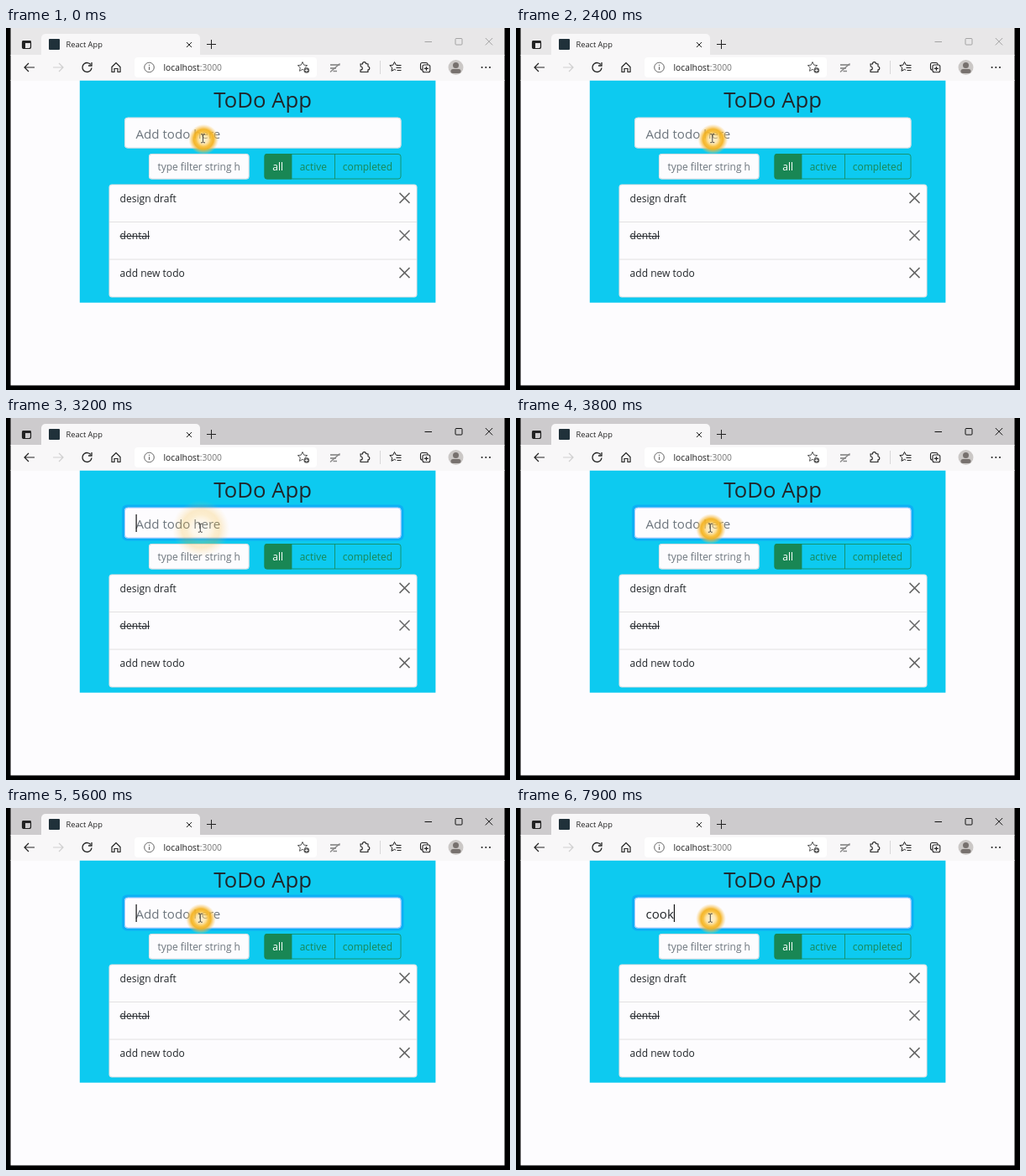
These frames come from a looping animation (600 px wide and 432 px high, 8 s). An HTML page with a canvas:

```html
<!DOCTYPE html>
<html lang="en">
<head>
<meta charset="utf-8">
<title>ToDo App</title>
<style>
html, body { margin: 0; width: 100%; height: 100%; overflow: hidden; background: #000; }
canvas { display: block; width: 600px; height: 432px; }
</style>
</head>
<body>
<canvas id="stage"></canvas>
<script>
const LOOP = 8000;
const FONT = '"Open Sans", "Noto Sans", sans-serif';
const INK = '#212529', MUTED = '#6c757d', GREEN = '#198754', CYAN = '#0dcaf0';
const PAGE = '#fdfcfe', BAR = '#f8f7f8';
const PRESS = 3000, FOCUS_AT = 3050, BLINK = 530;
const KEYS = [6850, 7100, 7300, 7550];
const WORD = 'cook';

const canvas = document.getElementById('stage');
const ctx = canvas.getContext('2d');
const dpr = window.devicePixelRatio || 1;
canvas.width = 600 * dpr;
canvas.height = 432 * dpr;

const clamp = v => Math.max(0, Math.min(1, v));
const ease = v => v * v * (3 - 2 * v);
const span = (t, a, b) => clamp((t - a) / (b - a));

function fill(x, y, w, h, color, r = 0) {
  ctx.fillStyle = color;
  ctx.beginPath();
  ctx.roundRect(x, y, w, h, r);
  ctx.fill();
}

function box(x, y, w, h, color, r = 0, lw = 1) {
  ctx.strokeStyle = color;
  ctx.lineWidth = lw;
  ctx.beginPath();
  ctx.roundRect(x, y, w, h, r);
  ctx.stroke();
}

// Each path is a flat list of x, y pairs.
function lines(color, lw, ...paths) {
  ctx.strokeStyle = color;
  ctx.lineWidth = lw;
  ctx.beginPath();
  for (const p of paths) {
    ctx.moveTo(p[0], p[1]);
    for (let i = 2; i < p.length; i += 2) ctx.lineTo(p[i], p[i + 1]);
  }
  ctx.stroke();
}

function arc(x, y, r, color, lw, from = 0, to = Math.PI * 2) {
  ctx.strokeStyle = color;
  ctx.lineWidth = lw;
  ctx.beginPath();
  ctx.arc(x, y, r, from, to);
  ctx.stroke();
}

function disc(x, y, r, color) {
  ctx.fillStyle = color;
  ctx.beginPath();
  ctx.arc(x, y, r, 0, Math.PI * 2);
  ctx.fill();
}

function text(str, x, y, size, color, weight = 400) {
  ctx.font = `${weight} ${size}px ${FONT}`;
  ctx.fillStyle = color;
  ctx.fillText(str, x, y);
  return ctx.measureText(str).width;
}

function cross(x, y, r, color, lw) {
  lines(color, lw, [x - r, y - r, x + r, y + r], [x + r, y - r, x - r, y + r]);
}

function plus(x, y, r, color, lw) {
  lines(color, lw, [x - r, y, x + r, y], [x, y - r, x, y + r]);
}

function star(x, y, r, color) {
  const pts = [];
  for (let i = 0; i <= 10; i++) {
    const a = -Math.PI / 2 + i * Math.PI / 5;
    const d = i % 2 ? r * 0.48 : r;
    pts.push(x + d * Math.cos(a), y + d * Math.sin(a));
  }
  lines(color, 1, pts);
}

function arrow(x, y, dir, color) {
  lines(color, 1.2, [x - 6 * dir, y, x + 6 * dir, y],
    [x - dir, y - 5, x - 6 * dir, y, x - dir, y + 5]);
}

function tabStrip(active) {
  fill(5.5, 0, 588, 33, active ? '#cdcbcd' : '#e8e7e8');
  box(19.5, 15.5, 10, 9, '#222', 2, 1.2);
  fill(19.5, 15, 10, 3, '#222');
  fill(19.5, 17, 3.5, 7, '#222');

  fill(42, 7, 189, 27, BAR, [5, 5, 0, 0]);
  fill(51, 13, 13, 13, '#20313a', 1);
  text('React App', 71.5, 23, 9.25, '#222');
  cross(218, 20, 3, '#222', 1);
  plus(244.5, 19.5, 5.5, '#222', 1);

  const c = active ? '#111' : '#a3a3a3';
  lines(c, 1, [498.5, 16.5, 507, 16.5]);
  box(535, 12.5, 8, 7.5, c, 1);
  cross(575, 16.2, 4.2, c, 1);
}

function toolbar() {
  fill(5.5, 32, 588, 31, BAR);
  arrow(28, 47, 1, '#222');
  arrow(62, 47, -1, '#d0d0d0');
  arc(96.5, 47, 5.5, '#222', 1.3, 0.1, 5.6);
  lines('#222', 1.3, [102, 41, 102, 45, 98, 45]);
  lines('#222', 1.2, [126, 46.5, 131, 41.5, 136, 46.5, 136, 52.5, 133, 52.5,
    133, 48.5, 129, 48.5, 129, 52.5, 126, 52.5, 126, 46]);

  fill(153, 35, 217, 24, '#fff', 4);
  arc(170.5, 47, 5.8, '#666', 1);
  lines('#666', 1.1, [170.5, 46.2, 170.5, 50], [170.5, 43.7, 170.5, 44.9]);
  const w = text('localhost', 187.5, 50.6, 10.3, '#1d1d1d');
  text(':3000', 187.5 + w, 50.6, 10.3, '#777');

  star(353, 46.5, 6, '#555');
  disc(357.8, 50.5, 3.8, '#fff');
  disc(357.8, 50.5, 3.3, '#555');
  plus(357.8, 50.5, 1.9, '#fff', 0.9);

  lines('#999', 1.8, [386, 44, 397.5, 44], [386, 48, 393, 48]);
  lines('#888', 1.4, [386, 52.5, 397.5, 42.5], [389.5, 51.5, 394, 51.5]);

  ctx.strokeStyle = '#222';
  ctx.lineWidth = 1.1;
  ctx.beginPath();
  ctx.moveTo(422, 43);
  ctx.lineTo(424.5, 43);
  ctx.arc(426.5, 42.6, 2, Math.PI, 0);
  ctx.lineTo(431, 43);
  ctx.lineTo(431, 46);
  ctx.arc(430.8, 48, 2, -Math.PI / 2, Math.PI / 2);
  ctx.lineTo(431, 52.5);
  ctx.lineTo(422, 52.5);
  ctx.lineTo(422, 50);
  ctx.arc(422.3, 48, 2, Math.PI / 2, -Math.PI / 2, true);
  ctx.closePath();
  ctx.stroke();
  lines('#d8d7d8', 1, [445.5, 39, 445.5, 55]);

  star(462.5, 46.5, 6, '#222');
  fill(464, 44, 7, 8, BAR);
  lines('#222', 1.1, [464.5, 44.5, 470.5, 44.5], [464.5, 47.5, 470.5, 47.5], [465.5, 50.5, 470.5, 50.5]);

  box(493.5, 41.5, 8.5, 8.5, '#222', 2, 1.1);
  fill(495.7, 43.7, 9.6, 9.6, BAR, 2);
  box(496, 44, 8.8, 8.8, '#222', 2, 1.1);
  plus(500.4, 48.4, 2.5, '#222', 1.1);

  disc(535.5, 47, 9, '#cbc8c6');
  ctx.save();
  ctx.beginPath();
  ctx.arc(535.5, 47, 9, 0, Math.PI * 2);
  ctx.clip();
  disc(535.5, 44.5, 3.5, '#77716e');
  fill(529.5, 49, 12, 5, '#77716e', 4);
  ctx.restore();
  for (let i = -1; i <= 1; i++) disc(571.3 + i * 4.7, 47, 1.05, '#222');
}

function todoField(t) {
  const focus = span(t, FOCUS_AT - 50, FOCUS_AT + 100);
  if (focus > 0) fill(138, 103.5, 335.5, 43, `rgba(13,110,253,${0.29 * focus})`, 6);
  fill(141, 106.7, 329.5, 36.8, PAGE, 4);
  box(141.4, 107.1, 328.7, 36, focus > 0.5 ? '#86b7fe' : '#ced4da', 4, 0.8);

  const typed = WORD.slice(0, KEYS.filter(k => t >= k).length);
  let caretX = 155;
  if (typed) caretX += text(typed, 154.5, 131.6, 15.1, INK);
  else text('Add todo here', 154.5, 131.6, 15.1, MUTED);

  // Every key press restarts the blink.
  const since = t - KEYS.reduce((last, k) => t >= k ? k : last, FOCUS_AT);
  if (since >= 0 && Math.floor(since / BLINK) % 2 === 0) fill(caretX - 0.5, 115, 1.2, 21, '#111');
}

function filters() {
  fill(170, 150, 119.5, 30.5, PAGE, 3.5);
  box(170.4, 150.4, 118.7, 29.7, '#ced4da', 3.5, 0.8);
  ctx.save();
  ctx.beginPath();
  ctx.rect(180, 150, 99.5, 30);
  ctx.clip();
  text('type filter string h', 180.5, 170.2, 11.95, MUTED);
  ctx.restore();

  fill(307.5, 150, 32.5, 30.5, GREEN, [3, 0, 0, 3]);
  box(308, 150.5, 162, 29.5, GREEN, 3, 0.8);
  lines(GREEN, 0.8, [340, 150.5, 340, 180], [391.5, 150.5, 391.5, 180]);
  text('all', 317.3, 170.2, 11.95, '#fff');
  text('active', 349.7, 170.2, 11.95, GREEN);
  text('completed', 400.8, 170.2, 11.95, GREEN);
}

function list() {
  fill(122.5, 186.5, 367, 135, PAGE, 4);
  box(122.9, 186.9, 366.2, 134.2, 'rgba(0,0,0,.14)', 4, 0.8);
  ['design draft', 'dental', 'add new todo'].forEach((label, i) => {
    const y = 207.6 + i * 44.6;
    const w = text(label, 135.6, y, 12.05, INK);
    if (i === 1) lines(INK, 1, [135.6, y - 3.6, 135.6 + w, y - 3.6]);
    cross(474.5, y - 4.7, 6, '#666', 1.5);
    if (i) lines('#dfdfdf', 0.9, [123, 186.9 + i * 44.6, 489, 186.9 + i * 44.6]);
  });
}

// A golden ring with a pale, see-through middle.
function halo(x, y, r, alpha) {
  const g = ctx.createRadialGradient(x, y, 0, x, y, r);
  g.addColorStop(0, 'rgba(255,226,150,.4)');
  g.addColorStop(0.28, 'rgba(254,215,120,.55)');
  g.addColorStop(0.5, 'rgba(248,188,48,.9)');
  g.addColorStop(0.66, 'rgba(244,178,32,.95)');
  g.addColorStop(0.84, 'rgba(247,190,70,.45)');
  g.addColorStop(1, 'rgba(250,205,110,0)');
  ctx.globalAlpha = alpha;
  disc(x, y, r, g);
  ctx.globalAlpha = 1;
}

function pointer(t) {
  const move = ease(span(t, 2250, 2750));
  const x = 234.5 - 3.2 * move;
  const y = 131.8 - 0.6 * move;
  const ripple = span(t, PRESS, PRESS + 350);
  const spread = ripple < 1 ? ripple : 0;
  halo(x + 0.7, y + 1, 18 + 28 * spread, (1 - spread) ** 1.6);
  lines('#333', 0.9, [x, y - 4, x, y + 4],
    [x - 2.5, y - 5, x - 0.8, y - 5, x, y - 4, x + 0.8, y - 5, x + 2.5, y - 5],
    [x - 2.5, y + 5, x - 0.8, y + 5, x, y + 4, x + 0.8, y + 5, x + 2.5, y + 5]);
}

function draw(t) {
  ctx.setTransform(dpr, 0, 0, dpr, 0, 0);
  fill(0, 0, 600, 432, '#000');
  fill(5.5, 62, 588, 364.5, PAGE);
  tabStrip(t >= PRESS);
  toolbar();
  fill(87.8, 62.7, 423.6, 265, CYAN);
  text('ToDo App', 247.3, 95, 25.7, INK, 500);
  todoField(t);
  filters();
  list();
  pointer(t);
}

const start = performance.now();
function tick() {
  draw((performance.now() - start) % LOOP);
  requestAnimationFrame(tick);
}
tick();
</script>
</body>
</html>
```
